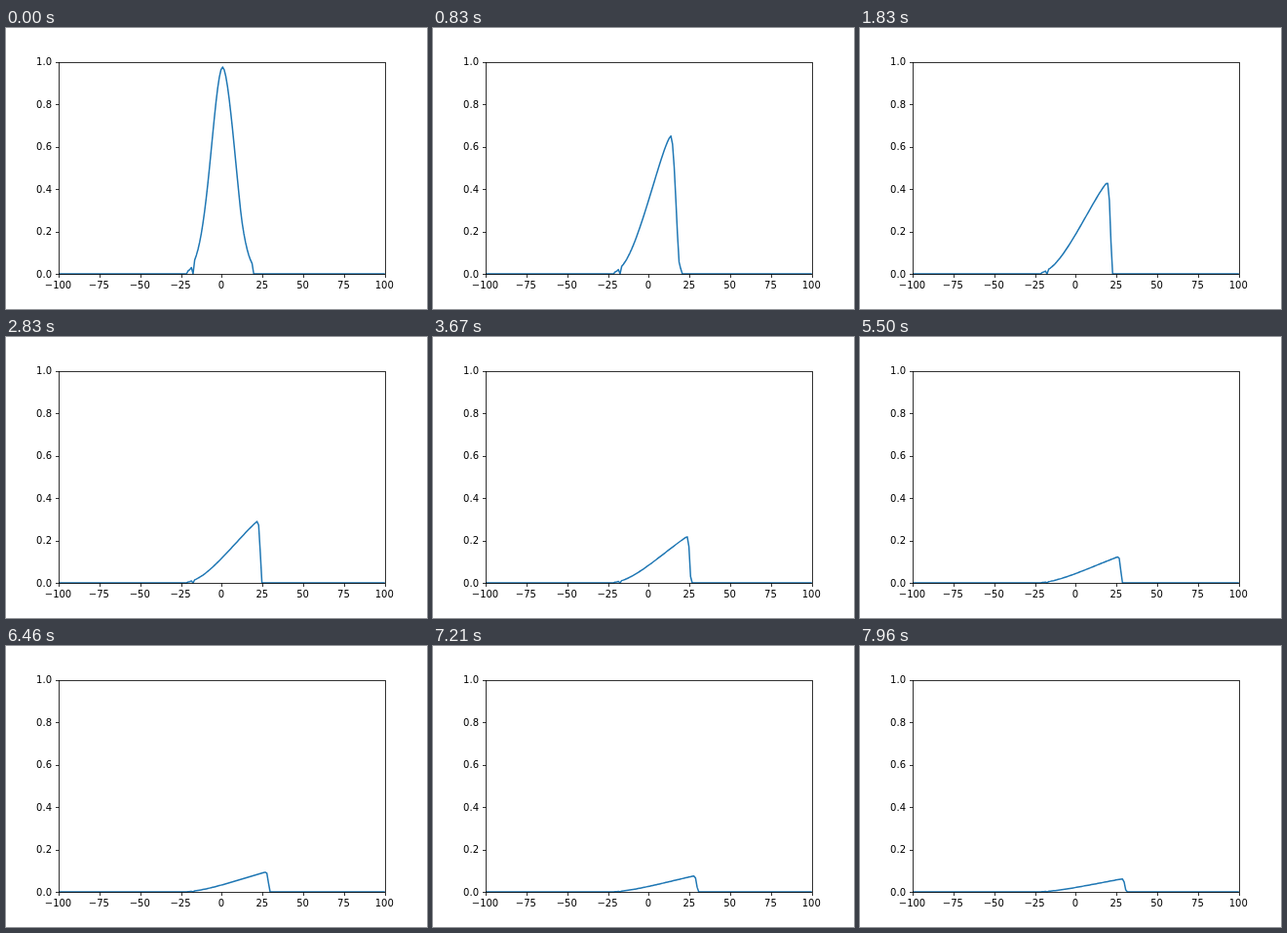
These frames come from a looping animation (432x288 px, 8 s). An HTML page:

```html
<!DOCTYPE html>
<html lang="en">
<head>
<meta charset="utf-8">
<title>Steepening wave</title>
<style>
  html, body { margin: 0; width: 100%; height: 100%; overflow: hidden; background: #fff; }
  svg { display: block; width: 432px; height: 288px; }
  text { font: 10px "DejaVu Sans", sans-serif; fill: #000; }
  .axis { fill: none; stroke: #000; stroke-width: .8; }
  #wave { fill: none; stroke: #1f77b4; stroke-width: 1.5; stroke-linejoin: round; }
</style>
</head>
<body>
<svg viewBox="0 0 432 288">
  <clipPath id="plot"><rect x="54" y="35" width="335.5" height="218"/></clipPath>
  <path id="wave" clip-path="url(#plot)"/>
  <g id="axes"><rect class="axis" x="54.5" y="35.5" width="335" height="217"/></g>
</svg>
<script>
const LOOP = 8000, FPS = 24, LAST = 191;
const SAMPLES = 200, NOTCH = 82;
const CENTER = 0.5, WIDTH = 10, HEIGHT = 0.975;

const toX = x => 221.4 + x * 1.674;
const toY = u => 252 - u * 217.44;

// Steps of the wave: peak height, peak place, foot of the front, front sharpness.
const STEPS = [0, 20, 44, 68, 110, 155, 191];
const logPeak = curve([0.975, 0.65, 0.43, 0.29, 0.162, 0.093, 0.061].map(Math.log));
const peakAt = curve([0.5, 13.5, 19.1, 21.7, 24.7, 26.8, 28.2]);
const footAt = curve([18.6, 19.6, 22.6, 24.6, 27.4, 29.5, 31.1]);
const sharpness = curve([0.93, 1.1, 1.5, 1.65, 1.65, 1.65, 1.65]);

// Smooth Hermite curve through one value per step.
function curve(values) {
  const end = STEPS.length - 1;
  const secant = i => (values[i + 1] - values[i]) / (STEPS[i + 1] - STEPS[i]);
  const inner = i => (secant(i - 1) + secant(i)) / 2;
  const slope = i =>
    i === 0 ? 2 * secant(0) - inner(1) :
    i === end ? 2 * secant(end - 1) - inner(end - 1) : inner(i);
  return n => {
    let i = 0;
    while (i < end - 1 && n >= STEPS[i + 1]) i++;
    const h = STEPS[i + 1] - STEPS[i], t = (n - STEPS[i]) / h, r = 1 - t;
    return values[i] * (1 + 2 * t) * r * r + slope(i) * h * t * r * r
      + values[i + 1] * t * t * (3 - 2 * t) - slope(i + 1) * h * t * t * r;
  };
}

const bell = x => Math.exp(-((Math.abs(x - CENTER) / WIDTH) ** 1.85));

// Left flank: each point of the bell travels in proportion to its height.
function flank(x, travel) {
  let low = -60, high = CENTER;
  for (let i = 0; i < 30; i++) {
    const mid = (low + high) / 2;
    if (mid + bell(mid) * travel < x) low = mid; else high = mid;
  }
  return bell(low);
}

function front(x, peak, foot, sharp) {
  const g = ((x - peak) / (foot - peak)) ** sharp;
  return Math.max(1 - g * g * (3 - 2 * g), bell(x));
}

// Small bump just left of the notch, by distance from it.
const ripple = [0, 0.03, 0.02, 0.014];

function wavePath(n) {
  const top = Math.exp(logPeak(n)), peak = peakAt(n), foot = footAt(n), sharp = sharpness(n);
  // The crest slowly runs into the front, which straightens the flank.
  const travel = (peak - CENTER) * (1 + n / 500);
  const crest = flank(peak, travel);
  const points = [];
  for (let i = 0; i < SAMPLES; i++) {
    const x = -100 + 200 * i / (SAMPLES - 1);
    let u = 0;
    if (i <= NOTCH) u = (ripple[NOTCH - i] || 0) * top / HEIGHT;
    else if (x <= peak) u = top * flank(x, travel) / crest;
    else if (x < foot) u = top * front(x, peak, foot, sharp);
    points.push(toX(x).toFixed(2) + " " + toY(u).toFixed(2));
  }
  return "M" + points.join("L");
}

function add(name, attributes, content = "") {
  const node = document.createElementNS("http://www.w3.org/2000/svg", name);
  for (const key in attributes) node.setAttribute(key, attributes[key]);
  node.textContent = content;
  document.getElementById("axes").append(node);
}

const snap = v => Math.floor(v + 0.5) + 0.5;

for (let v = -100; v <= 100; v += 25) {
  add("path", { class: "axis", d: `M${snap(toX(v))} 252.5v3.5` });
  add("text", { x: toX(v) - 0.5, y: 267, "text-anchor": "middle" }, String(v).replace("-", "\u2212"));
}
for (let i = 0; i <= 5; i++) {
  const y = toY(i / 5);
  add("path", { class: "axis", d: `M54.5 ${snap(y)}h-3.5` });
  add("text", { x: 47, y: Math.round(y + 3.8), "text-anchor": "end" }, (i / 5).toFixed(1));
}

const wave = document.getElementById("wave");
let shown = -1;

function draw(now) {
  const n = Math.min(LAST, Math.floor((now % LOOP + 5) * FPS / 1000));
  if (n !== shown) wave.setAttribute("d", wavePath(shown = n));
}

const start = performance.now();
function tick() {
  draw(performance.now() - start);
  requestAnimationFrame(tick);
}
tick();
</script>
</body>
</html>
```
